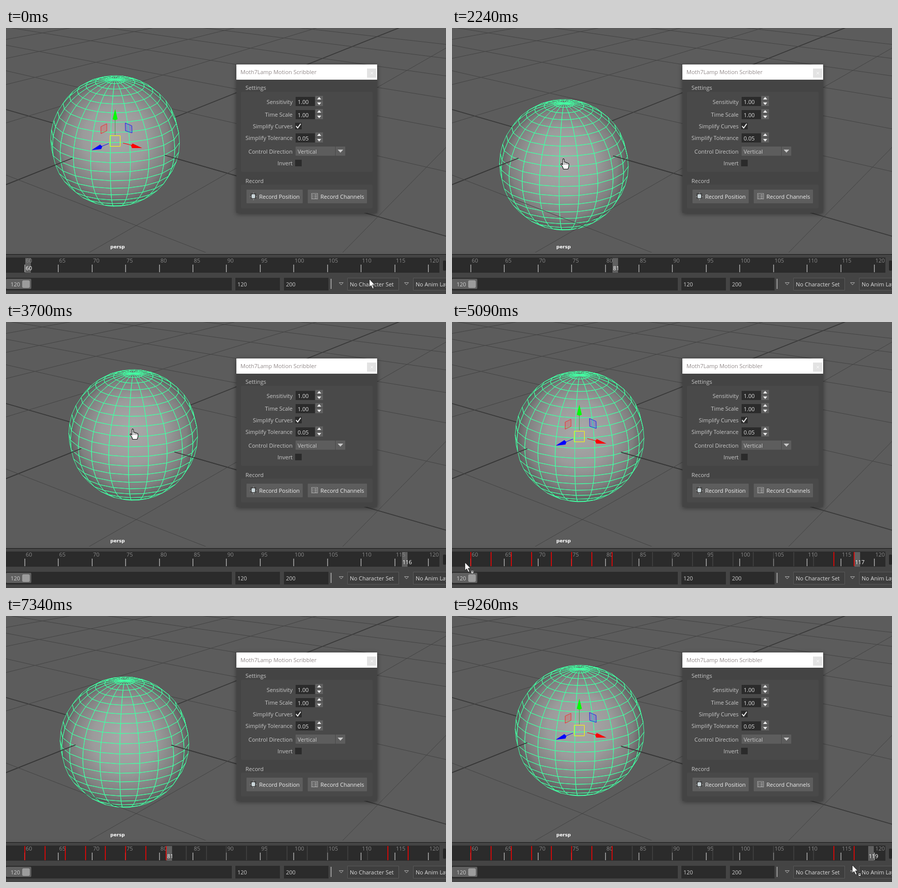
These frames come from a looping animation (869x525 px, 9340 ms). An HTML page with a canvas:

```html
<!DOCTYPE html>
<html lang="en">
<head>
<meta charset="utf-8">
<title>Viewport recording</title>
<style>
html, body { margin: 0; width: 100%; height: 100%; overflow: hidden; background: #5c5c5c; }
canvas { display: block; width: 869px; height: 525px; }
</style>
</head>
<body>
<canvas id="stage" width="869" height="525"></canvas>
<script>
const g = document.getElementById('stage').getContext('2d');
const LOOP = 9340, STEP = 76.8, R = 128;
const UI = '"Open Sans", "Noto Sans", sans-serif';
const ORIGIN = [216, 223];

// Spans of time in which the picture moves; it holds between them.
const SPANS = [[0, 0], [70, 70], [140, 140], [310, 690], [860, 1780], [1850, 2780],
  [2850, 3780], [4010, 4080], [4630, 5320], [5490, 5640], [6500, 7420], [7500, 8420],
  [8490, 8960], [9260, 9260]];

// Ball centre by timeline frame: [frame, x, y]
const SKETCH = [[60, 215.5, 223], [66, 166, 214], [70, 188, 186], [73.3, 224, 167], [77, 278, 212],
  [81.16, 221, 270], [85.5, 179, 230], [90, 222, 187], [95, 273, 222], [99, 232, 266],
  [103.2, 175, 252], [105.5, 164, 232], [109.5, 205, 206], [113.5, 246, 215], [117, 252, 226]];
const CURVE = [[60, 215.5, 223], [66, 152, 214], [73, 215, 175], [77, 279, 210], [81.16, 234, 249],
  [85.5, 183, 234], [90, 225, 185], [96, 275, 222], [100, 266, 247], [104.66, 240, 250],
  [109, 210, 238], [114, 238, 227], [117, 252, 226], [119, 252, 226]];

// Pointer tip: [ms, x, y]
const POINTER = [[0, 717, 495], [70, 610, 437], [140, 490, 371], [310, 494, 362], [460, 509, 339],
  [690, 511, 337], [860, 478, 322], [1090, 320, 255], [1260, 215, 212], [1349, 214.5, 211]];
const LEAVE = [[3780, 251, 217], [4010, 312, 240], [4080, 378, 266], [4630, 345, 290],
  [4860, 160, 405], [5090, 25, 474], [5200, 42, 487], [5320, 35, 464], [5490, 240, 452],
  [5567, 560, 442], [5644, 880, 437]];

const clamp = (v, a, b) => Math.min(b, Math.max(a, v));

function hold(t) {
  let span = SPANS[0];
  for (const s of SPANS) if (t >= s[0]) span = s;
  const k = Math.floor((t - span[0] + 7) / STEP);
  return Math.min(span[1], span[0] + k * STEP);
}

function along(pts, u, smooth) {
  const n = pts.length - 1;
  u = clamp(u, pts[0][0], pts[n][0]);
  let i = 0;
  while (i < n - 1 && u > pts[i + 1][0]) i++;
  const a = pts[i], b = pts[i + 1], d = b[0] - a[0], p = (u - a[0]) / d;
  if (!smooth) return [1, 2].map(c => a[c] + (b[c] - a[c]) * p);
  const z = pts[Math.max(0, i - 1)], e = pts[Math.min(n, i + 2)];
  return [1, 2].map(c => {
    const m = (b[c] - z[c]) / (b[0] - z[0]) * d, q = (e[c] - a[c]) / (e[0] - a[0]) * d;
    const p2 = p * p, p3 = p2 * p;
    return (2 * p3 - 3 * p2 + 1) * a[c] + (p3 - 2 * p2 + p) * m
      + (3 * p2 - 2 * p3) * b[c] + (p3 - p2) * q;
  });
}

function rect(x, y, w, h, color, r = 0) {
  g.fillStyle = color;
  if (!r) return g.fillRect(x, y, w, h);
  g.beginPath();
  g.roundRect(x, y, w, h, r);
  g.fill();
}

function frame(x, y, w, h, color) {
  g.strokeStyle = color;
  g.lineWidth = 1;
  g.strokeRect(x + .5, y + .5, w - 1, h - 1);
}

function line(x1, y1, x2, y2, color, w = 1) {
  g.strokeStyle = color;
  g.lineWidth = w;
  g.beginPath();
  g.moveTo(x1, y1);
  g.lineTo(x2, y2);
  g.stroke();
}

function poly(pts, fill, stroke, w = 1) {
  g.beginPath();
  for (let i = 0; i < pts.length; i += 2) g.lineTo(pts[i], pts[i + 1]);
  g.closePath();
  if (fill) { g.fillStyle = fill; g.fill(); }
  if (stroke) { g.strokeStyle = stroke; g.lineWidth = w; g.stroke(); }
}

function text(s, x, y, color = '#c8c8c8', align = 'left', font = '11px ' + UI) {
  g.font = font;
  g.textAlign = align;
  g.fillStyle = color;
  g.fillText(s, x, y);
}

// Ground grid: two families of lines, each running to its vanishing point.
const VA = [-1299, -213], VB = [1310, -213];
const onAxis = (vp, w) => ORIGIN.map((o, i) => (o + w * vp[i]) / (1 + w));

function gridLine(p, vp, color, w) {
  const m = (p[1] - vp[1]) / (p[0] - vp[0]);
  const at = x => p[1] + (x - p[0]) * m;
  line(-20, at(-20), 890, at(890), color, w);
}

function grid(from, to) {
  for (let s = from; s <= to; s++) {
    const axis = s === 0, color = axis ? '#383838' : '#444', w = axis ? 1.7 : 1;
    if (s <= 6) gridLine(onAxis(VB, s * .1493), VA, color, w);
    if (s <= 5) gridLine(onAxis(VA, s * .1275), VB, color, w);
  }
}

// Unit ball, 20 by 20 faces, seen from a fixed camera.
const RAD = Math.PI / 180, SE = Math.sin(19.5 * RAD), CE = Math.cos(19.5 * RAD);
function vertex(i, j) {
  const lat = (90 - i * 9) * RAD, lon = (j * 18 - 4.3) * RAD;
  const x = Math.cos(lat) * Math.sin(lon), y = Math.sin(lat), z = Math.cos(lat) * Math.cos(lon);
  return [x, z * SE - y * CE, z * CE + y * SE];
}
const FACES = [];
for (let i = 0; i < 20; i++) for (let j = 0; j < 20; j++) {
  if (vertex(i + .5, j + .5)[2] > 0)
    FACES.push([vertex(i, j), vertex(i, j + 1), vertex(i + 1, j + 1), vertex(i + 1, j)]);
}

function ball(cx, cy) {
  const shade = g.createRadialGradient(cx, cy - 12, 8, cx, cy, R + 2);
  shade.addColorStop(0, '#a7a7a7');
  shade.addColorStop(.45, '#9b9b9b');
  shade.addColorStop(.8, '#7f7f7f');
  shade.addColorStop(1, '#575757');
  g.beginPath();
  for (const f of FACES) {
    f.forEach((v, k) => g[k ? 'lineTo' : 'moveTo'](cx + v[0] * 127.5, cy + v[1] * 129));
    g.closePath();
  }
  g.fillStyle = shade;
  g.fill();
  g.strokeStyle = '#43ffa3';
  g.lineWidth = 1;
  g.lineJoin = 'round';
  g.stroke();
}

// Parts of both axes that come out of the ball towards the viewer.
function frontAxes(cx, cy) {
  const dx = cx - ORIGIN[0], dy = cy - ORIGIN[1];
  for (const [ux, uy, slope, end] of [[-.66, .26, -.3986, 0], [.763, .219, .2877, 500]]) {
    const b = ux * dx + uy * dy;
    const s = b + Math.sqrt(Math.max(0, b * b + R * R - dx * dx - dy * dy));
    const x = ORIGIN[0] + ux * s, y = v => ORIGIN[1] + (v - ORIGIN[0]) * slope;
    line(x, y(x), end, y(end), '#383838', 1.7);
  }
}

function gizmo(cx, cy) {
  g.save();
  g.translate(Math.round(cx) - 216, Math.round(cy) - 223);
  line(215.5, 211, 215.5, 181, '#4c9a4c');
  poly([215.5, 160, 220.5, 180, 215.5, 182, 210.5, 180], '#0f0');
  line(231, 227, 250, 232, '#f00');
  poly([269, 237, 250, 228, 247, 232, 249, 237], '#f00');
  line(203, 228, 188, 234, '#11e');
  poly([169, 241, 186, 230, 190, 234, 188, 239], '#00f');
  poly([187.5, 194.5, 199, 189, 199, 203, 187.5, 208.5], 'rgba(255,60,60,.22)', '#e33');
  poly([235.5, 187.5, 248.5, 193, 249, 207, 236, 203], 'rgba(60,60,255,.22)', '#22e');
  frame(205, 212, 21, 22, '#ff0');
  rect(215, 222, 1, 1, '#ff0');
  g.restore();
}

function spin(y, value) {
  rect(572, y - 9, 38, 18, '#2b2b2b');
  text(value, 576, y + 5, '#ddd');
  rect(611, y - 11, 15, 9, '#606060');
  rect(611, y - 1, 15, 10, '#606060');
  poly([614.5, y - 4, 618.5, y - 9, 622.5, y - 4], '#eee');
  poly([614.5, y + 2, 618.5, y + 7, 622.5, y + 2], '#eee');
}

function dialog(active, hover, down) {
  g.save();
  g.shadowColor = 'rgba(0,0,0,.45)';
  g.shadowBlur = 9;
  g.shadowOffsetY = 2;
  rect(455, 72, 278, 293, '#444');
  g.restore();
  rect(455, 72, 278, 30, '#fff');
  text('Moth7Lamp Motion Scribbler', 463, 91, active ? '#111' : '#938b8b');
  rect(713, 80, 18, 18, active ? '#c75050' : '#e2e2e2');
  line(720, 86.5, 725, 91.5, '#fff');
  line(725, 86.5, 720, 91.5, '#fff');

  text('Settings', 473, 122);
  rect(464, 126, 260, 158, '#494949', 2);
  text('Record', 473, 306);
  rect(464, 309, 260, 47, '#494949', 2);
  const rows = [['Sensitivity', 150], ['Time Scale', 175], ['Simplify Curves', 198],
    ['Simplify Tolerance', 221], ['Control Direction', 248], ['Invert', 271]];
  for (const [s, y] of rows) text(s, 566, y, '#c8c8c8', 'right');
  spin(145, '1.00');
  spin(171, '1.00');
  spin(217, '0.05');
  rect(571, 187, 13, 13, '#2b2b2b');
  rect(571, 260, 13, 13, '#2b2b2b');
  g.strokeStyle = '#eee';
  g.lineWidth = 2;
  g.beginPath();
  g.moveTo(573, 193.5);
  g.lineTo(576, 197.5);
  g.lineTo(582, 189);
  g.stroke();
  rect(572, 234, 78, 18, '#5d5d5d');
  text('Vertical', 576, 248, '#ccc');
  rect(651, 234, 19, 18, '#5d5d5d');
  poly([655, 240, 666, 240, 660.5, 246], '#c8c8c8');

  rect(475, 319, 111, 27, down ? '#2b2b2b' : hover ? '#6c6c6c' : '#5d5d5d', 1);
  rect(596, 319, 117, 27, '#5d5d5d', 1);
  rect(483, 326, 11, 11, '#424242');
  rect(485, 328, 7, 8, '#c9d4d8', 2);
  for (const [x, y] of [[488, 325], [488, 338], [482, 332], [494, 332]]) rect(x, y, 1.5, 1.5, '#aaa');
  text('Record Position', 500, 337, '#eee');
  frame(603, 326, 13, 12, '#a8a8a8');
  for (const y of [329, 332, 335]) {
    rect(605, y, 2, 1, '#ccc');
    rect(609, y, 5, 1, '#ccc');
  }
  text('Record Channels', 621, 337, '#eee');
}

const tickX = f => 37 + (f - 60) * 13.283;

function timeline(now, keyed) {
  rect(0, 443, 869, 82, '#444');
  rect(0, 444, 869, 1, '#8a8a8a');
  rect(0, 445, 869, 3, '#373737');
  rect(0, 453, 856, 30, '#2b2b2b');
  rect(863, 459, 6, 20, '#262626', 2);
  rect(Math.round(tickX(now)) + 1, 454, 11, 29, '#606060');
  for (let f = 60; f <= 120; f += 5) {
    const x = Math.round(tickX(f));
    text(f, x + 2, 463, '#888');
    rect(x - .5, 467, 1.5, 15, '#aaa');
  }
  if (keyed) for (let f = 60; f <= 117; f += 3) {
    const red = f <= 81 || f >= 114;
    rect(Math.round(tickX(f)) - .5, 454, red ? 1.5 : 1, 28, red ? '#f00' : '#505050');
  }
  text(now, Math.round(tickX(now)) + 2, 478, '#fff');

  rect(0, 493, 446, 25, '#2b2b2b');
  rect(0, 495, 50, 20, '#606060', 2);
  text('120', 9, 510, '#ccc');
  rect(32, 498, 15, 15, '#9c9c9c', 3);
  rect(453, 493, 88, 25, '#2b2b2b');
  text('120', 457, 510, '#ccc');
  rect(549, 493, 88, 25, '#2b2b2b');
  text('200', 553, 510, '#ccc');
  rect(641, 495, 2, 20, '#989898');
  for (const x of [662, 791]) poly([x - 4, 502.5, x + 4, 502.5, x, 507], null, '#aaa');
  for (const [x, s] of [[674, 'No Character Set'], [804, 'No Anim Layer']]) {
    rect(x, 493, 102, 25, '#3e3e3e', 2);
    frame(x, 493, 102, 25, '#595959');
    text(s, x + 5, 510, '#ddd');
  }
}

function arrow(x, y, badge) {
  g.save();
  g.translate(x, y);
  poly([.5, .5, .5, 16.5, 4, 13, 7, 19.5, 9.5, 18.5, 6.7, 12, 11.5, 12], '#fff', '#111', .8);
  if (badge) {
    rect(12, 16, 6, 7, '#eee');
    frame(12, 16, 6, 7, '#222');
    rect(14, 18, 2, 2, '#333');
  }
  g.restore();
}

function hand(x, y) {
  g.save();
  g.translate(Math.round(x), Math.round(y));
  poly([-1, 1, 0, 0, 1.5, 1, 2, 7, 4, 6.5, 5, 8, 7, 7.5, 8, 9, 10, 9, 11, 11, 10.5, 16,
    9, 20.5, 0, 20.5, -1.5, 16, -5, 11, -4, 9.5, -1, 12], '#fff', '#111', 1.1);
  for (const k of [2, 5, 8]) rect(k, 8, 1, 4, '#555');
  g.restore();
}

function pointer(t, cx, cy) {
  if (t < 1349) {
    const [x, y] = along(POINTER, t);
    return t < 860 ? arrow(x, y, false) : hand(x, y);
  }
  if (t < 3780) return hand(cx - 1, cy - 12);
  if (t < 5650) {
    const [x, y] = along(LEAVE, t);
    return t < 4630 ? hand(x, y) : arrow(x, y, y > 445);
  }
  if (t >= 9260) arrow(790, 491, true);
}

function draw(ms) {
  const t = hold(ms), playing = t >= 6500;
  const f = playing ? clamp(60.6 + (t - 6470) * .0235, 60, 119)
    : clamp(81.3 + (t - 2240) * .0239, 60, 117);
  const [cx, cy] = along(playing ? CURVE : SKETCH, f, true);

  rect(0, 0, 869, 525, '#5c5c5c');
  grid(0, 6);
  ball(cx, cy);
  frontAxes(cx, cy);
  grid(-2, -1);
  if (t < 860 || (t >= 4630 && !playing) || t >= 8950) gizmo(cx, cy);
  text('persp', 206, 435, '#fff', 'left', 'bold 9px "DejaVu Sans", sans-serif');
  dialog(t > 520 && t < 1349, t > 380 && t < 860, t > 520 && t < 640);
  timeline(Math.floor(f), t >= 4630);
  pointer(t, cx, cy);
}

const start = performance.now();
function tick() {
  draw((performance.now() - start) % LOOP);
  requestAnimationFrame(tick);
}
tick();
</script>
</body>
</html>
```
